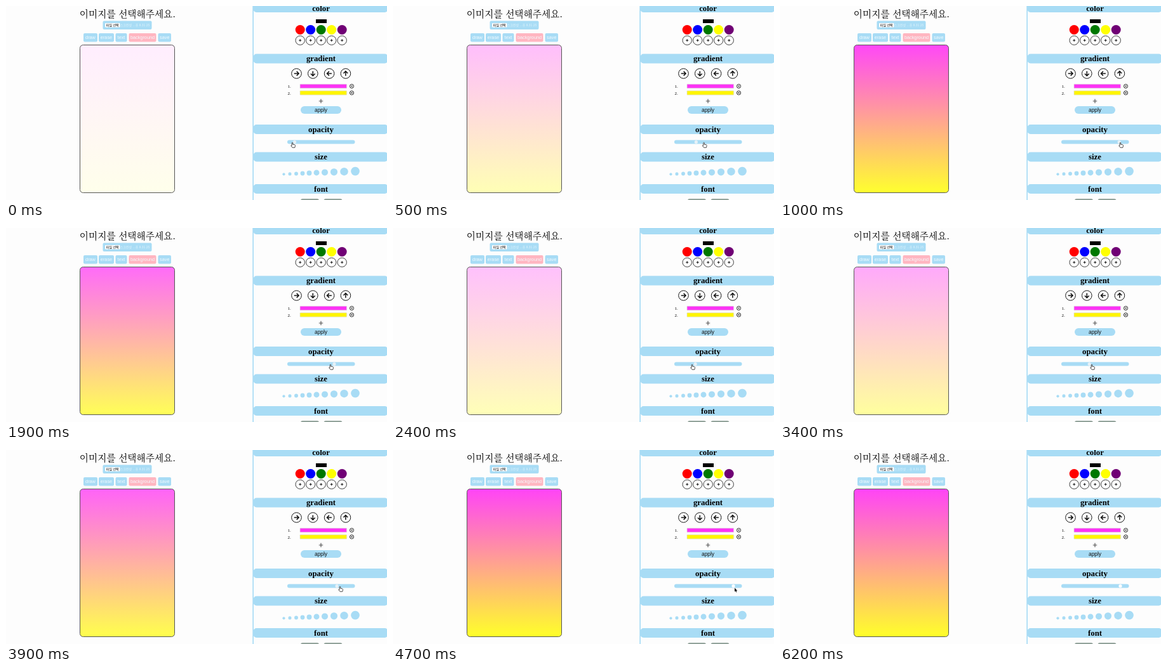
An HTML page for the animation above (6300 ms loop, 600x306 px).

```html
<!DOCTYPE html>
<html lang="ko">
<head>
<meta charset="utf-8">
<style>
  html, body { margin: 0; width: 100%; height: 100%; overflow: hidden; background: #fdfdfd; }
  svg { display: block; width: 100%; height: 100%; }
  text { text-anchor: middle; }
  .head { font: bold 12.8px "Liberation Serif", serif; }
  .num { font: 7px "Liberation Serif", serif; }
  .sans { font: 7.3px "Liberation Sans", sans-serif; }
  .title { font: 14.7px "Noto Serif CJK KR", "Noto Sans CJK KR", "Noto Sans CJK", serif; }
  .tiny { font: 5px "Noto Sans CJK KR", "Noto Sans CJK", sans-serif; }
</style>
</head>
<body>
<svg id="stage" viewBox="0 0 600 306">
  <defs>
    <linearGradient id="fade" x2="0" y2="1">
      <stop stop-color="#ff2ff6"/>
      <stop offset="1" stop-color="#ffff12"/>
    </linearGradient>
  </defs>
  <g id="ui"></g>
  <rect x="116.5" y="61.5" width="149" height="233" rx="5" fill="#fff"/>
  <rect id="paint" x="116.5" y="61.5" width="149" height="233" rx="5" fill="url(#fade)"/>
  <rect x="116.5" y="61.5" width="149" height="233" rx="5" fill="none" stroke="#555"/>
  <circle id="thumb" cy="214.5" r="2.6"/>
  <path id="hand" d="M-.8 .6Q0-.6 .8 .6V3L3.8 3.6Q4.8 4 4.5 5.3L3.8 8H0L-2.2 5.2Q-2.3 4 -.8 4.8Z" fill="#fff" stroke="#222" stroke-width=".8" stroke-linejoin="round"/>
  <path id="arrow" d="M0 0V6L1.4 4.8 2.4 7 3.4 6.5 2.4 4.4H4.2Z" transform="translate(538 217.5)" fill="#000" stroke="#fff" stroke-width=".5" paint-order="stroke"/>
</svg>
<script>
const $ = id => document.getElementById(id);
const BLUE = '#a8dcf5';
const parts = [];

const rect = (x, y, w, h, r, fill, extra = '') =>
  parts.push(`<rect x="${x}" y="${y}" width="${w}" height="${h}" rx="${r}" fill="${fill}" ${extra}/>`);
const text = (cls, x, y, str, fill = '#000', extra = '') =>
  parts.push(`<text class="${cls}" x="${x}" y="${y}" fill="${fill}" ${extra}>${str}</text>`);
const circle = (x, y, r, fill) =>
  parts.push(`<circle cx="${x}" cy="${y}" r="${r}" fill="${fill}"/>`);
const ring = (x, y, r, w) =>
  parts.push(`<circle cx="${x}" cy="${y}" r="${r}" fill="#fff" stroke="#111" stroke-width="${w}"/>`);
const icon = (x, y, d, w, turn = 0, color = '#111') =>
  parts.push(`<path d="${d}" transform="translate(${x} ${y}) rotate(${turn})" fill="none" stroke="${color}" stroke-width="${w}"/>`);
const plus = s => `M${-s} 0H${s}M0 ${-s}V${s}`;

// Left: title, file picker and tools
text('title', 191.5, 18, '이미지를 선택해주세요.');
rect(152.5, 23.5, 77, 13.5, 2, BLUE);
rect(156, 27, 23.5, 6.5, 1, '#fff');
text('tiny', 167.7, 32, '파일 선택', '#000', 'font-weight="bold"');
text('tiny', 203, 32.2, '스크린샷 ...후 8.31.25', '#e4f5fd');
[['draw', 122, 22], ['erase', 146, 24], ['text', 172.5, 18], ['background', 193.5, 43], ['save', 239.5, 20.5]]
  .forEach(([label, x, w]) => {
    rect(x, 43, w, 13.5, 2, label === 'background' ? '#ffb6c1' : BLUE);
    text('sans', x + w / 2, 52.2, label, '#f4fbff');
  });

// Right: option panel
rect(388.3, 0, 1.7, 306, 0, BLUE);
[['color', -5, 8], ['gradient', 75.5, 87], ['opacity', 187, 199], ['size', 230.5, 242], ['font', 281, 292.5]]
  .forEach(([label, y, base]) => {
    rect(389.5, y, 212, 15, 5, BLUE);
    text('head', 496, base, label);
  });

rect(488, 21, 17, 6, 0, '#000');
['#f00', '#00f', '#007800', '#ff0', '#700075'].forEach((color, i) => {
  const x = 463.2 + i * 16.5;
  circle(x, 37.5, 7.5, color);
  ring(x, 54.2, 7.2, .8);
  icon(x, 54.2, plus(2), 1);
});

[0, 90, 180, 270].forEach((turn, i) => {
  const x = 457.5 + i * 25.8;
  ring(x, 106.5, 7.8, 1);
  icon(x, 106.5, 'M-3.8 0H3.5M.2-3.4L3.6 0 .2 3.4', 1.5, turn);
});

['#fc33f5', '#fff500'].forEach((color, i) => {
  const y = 126.5 + i * 10.5;
  text('num', 446, y + 2.5, i + 1 + '.');
  rect(463, y - 3.2, 73.5, 6.4, .5, color, 'stroke="#ddd" stroke-width=".7"');
  ring(544.5, y, 3.1, .9);
  icon(544.5, y, plus(1.8), .9, 45);
});
icon(496, 150, plus(3.2), 1.2, 0, '#555');
rect(464, 158, 64, 12, 6, BLUE);
text('sans', 496, 166.8, 'apply', '#111', 'style="font-size:8.4px"');

rect(443, 211.5, 106.5, 6, 3, BLUE);
[437.5, 447, 457, 467, 477.5, 489, 502, 516.5, 532.5, 550].forEach((x, i) =>
  circle(x, 267.4 - (2.1 + i * .4 + i * i * .014), 2.1 + i * .4 + i * i * .014, BLUE));
[464, 500.5].forEach(x => rect(x, 304, 29, 10, 3, '#93a39b'));
$('ui').innerHTML = parts.join('');

// Pointer x over time (ms); the thumb trails it while dragging
const drag = [[-100, 456], [0, 451], [200, 447], [450, 480], [700, 528], [1000, 536], [1400, 547], [1500, 545],
  [1900, 511], [2100, 493], [2400, 471], [2700, 463], [2900, 464], [3400, 491], [4000, 533], [4200, 536]];
function pointerX(t) {
  const i = drag.findIndex(([time]) => time > t);
  if (i < 0) return 536;
  const [t0, x0] = drag[i - 1], [t1, x1] = drag[i];
  return x0 + (x1 - x0) * (t - t0) / (t1 - t0);
}

function draw(now) {
  const t = Math.floor(now % 6300 / 100) * 100;
  const x = Math.min(pointerX(t - 70), 546);
  const dragging = t < 4300;
  $('paint').setAttribute('opacity', (x - 446) / 100);
  $('thumb').setAttribute('cx', x);
  $('thumb').setAttribute('fill', dragging ? '#e6f1f7' : '#fff');
  $('hand').setAttribute('transform', `translate(${pointerX(t)} 215.3)`);
  $('hand').setAttribute('visibility', dragging ? 'visible' : 'hidden');
  $('arrow').setAttribute('visibility', !dragging && t < 4900 ? 'visible' : 'hidden');
  requestAnimationFrame(() => draw(performance.now()));
}
draw(performance.now());
</script>
</body>
</html>
```
